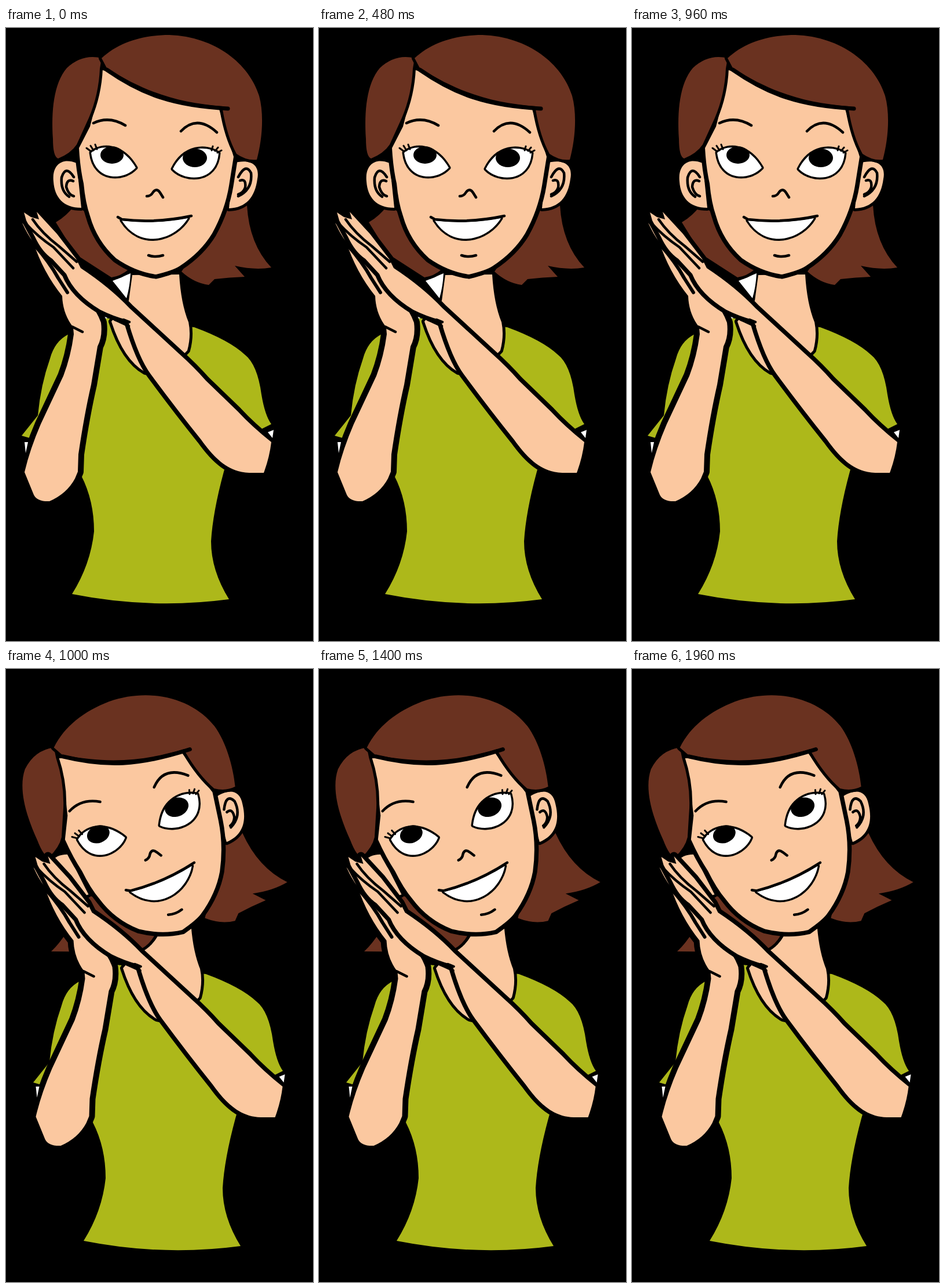
Animation of 530 by 1057 pixels, one loop 2000 ms. Source, as an HTML page:

```html
<!DOCTYPE html>
<html lang="en">
<head>
<meta charset="utf-8">
<title>Tilting head</title>
<style>
  html, body { margin: 0; width: 100%; height: 100%; overflow: hidden; background: #000; }
  svg { display: block; width: 100%; height: 100%; }
  path, ellipse { stroke: #000; stroke-width: 10; stroke-linejoin: round; stroke-linecap: round; paint-order: stroke; }
  .skin { fill: #fbc8a0; }
  .hair { fill: #6a3220; }
  .shirt { fill: #adb81a; }
  .white { fill: #fff; stroke-width: 7; }
  .line { fill: none; stroke-width: 4.5; }
  .thin { fill: none; stroke-width: 3; }
  .bold { stroke-width: 15; }
  .heavy { stroke-width: 20; }
  .bare { stroke: none; }
</style>
</head>
<body>
<svg viewBox="0 0 530 1057">
  <g id="body">
    <path class="shirt" d="M108 528 Q84 540 76 570 Q60 615 55 668 L27 703 L48 709 L110 640 L130 772 Q152 815 152 868 Q146 925 114 976 Q250 1003 385 985 Q354 935 354 885 Q357 835 376 765 L400 680 L440 692 L458 683 Q447 668 441 632 Q434 580 412 563 Q385 538 325 516 L170 500 Z"/>
    <path class="skin" d="M218 426 L299 425 Q302 475 315 507 Q320 530 313 556 L270 600 L240 593 Q203 572 182 506 L212 470 Z"/>
  </g>

  <path id="collar" class="white bare" d="M184 436 L215 423 Q214 445 208 466 Z M165 494 L176 500 L166 502 Z"/>
  <path id="tuckedHair" class="hair" d="M106 452 Q92 474 78 487 L215 488 L235 479 Q249 473 257 459 L200 430 Z"/>

  <g id="head">
    <path class="hair" d="M390 290 L416 306 Q420 373 458 413 Q430 418 395 410 L412 429 Q385 430 360 433 L350 443 Q325 440 303 420 Z"/>
    <path class="hair" d="M118 306 Q105 324 86 335 L120 390 L182 430 Q198 428 212 416 L160 330 Z"/>
    <path class="skin" d="M122 233 C95 222 79 238 82 265 C84 292 99 310 130 310 Z"/>
    <path class="skin" d="M392 233 C420 225 439 234 434 260 C430 292 414 310 385 311 Z"/>
    <path id="leftEarFold" class="line" d="M117 257 Q103 235 96 258 Q94 281 109 291 M116 264 Q105 259 104 274 Q108 288 117 290"/>
    <path class="line" d="M401 257 Q414 232 423 250 Q426 278 401 290 M404 263 Q415 259 413 275 Q410 284 401 287"/>
    <path class="skin bold" d="M165 72 L160 112 L145 170 L126 207 Q128 242 134 268 Q137 301 145 324 Q157 367 190 397 Q223 420 259 425 Q288 418 299 411 Q336 387 356 354 Q378 314 385 272 L393 222 L368 140 L230 95 Z"/>
    <path class="hair" d="M165 52 Q132 44 105 69 C82 96 78 144 81 191 Q81 222 90 225 Q112 216 122 201 L143 155 Q160 115 162 70 Z"/>
    <path class="hair" d="M165 52 C195 24 237 12 282 12 C362 15 420 62 437 117 C446 150 442 194 433 227 Q415 229 398 217 Q382 188 374 141 L374 135 C300 129 244 113 174 69 Z"/>
    <path class="line" style="stroke-width:7" d="M174 72 C236 115 290 134 383 139"/>

    <path class="line" d="M151 164 Q178 151 206 168 M302 178 Q330 149 364 180 M243 290 Q250 290 254 283 Q260 275 266 284 L271 292 M246 392 Q258 396 271 392"/>
    <path class="white" d="M147 215 C165 200 201 201 224 241 C204 263 153 266 147 215 Z"/>
    <path class="white" d="M288 243 C308 203 345 202 367 216 C363 266 310 266 288 243 Z"/>
    <ellipse class="bare" cx="183" cy="219" rx="20" ry="15"/>
    <ellipse class="bare" cx="326" cy="224" rx="21" ry="16"/>
    <path class="thin" d="M147 213 L139 207 M151 211 L146 203 M157 209 L154 201 M355 211 L357 204 M361 212 L366 206 M365 215 L372 211"/>
    <path class="white" d="M200 332 Q258 339 314 328 C292 365 232 383 200 332 Z"/>
    <path class="line" d="M193 326 L200 330 Q258 337 320 324"/>
  </g>

  <g id="arms">
    <path class="skin heavy" d="M28 336 Q37 356 47 369 Q64 421 97 462 Q98 493 116 516 L117 528 Q112 566 99 600 L60 683 Q41 727 32 766 L48 805 Q54 817 75 816 Q105 803 119 777 L124 765 L125 735 Q135 667 147 615 L158 549 Q167 532 164 508 Q157 488 143 474 L95 410 Z"/>
    <!-- hand and forearm drawn as one shape, so the wrist stays open -->
    <path class="skin bold" d="M212 509 Q230 570 250 597 Q296 659 337 710 C362 745 386 766 420 767 L445 767 Q455 740 458 714 Q424 687 400 661 L345 608 Q325 585 298 561 L213 483 Q179 447 129 414 L121 398 L88 355 L53 317 L57 330 L43 326 L31 318 L35 332 L50 360 Q62 386 80 398 L104 424 Q118 459 163 486 Q185 497 208 503 Z"/>
    <path class="line" d="M34 337 Q54 359 82 378 L116 414 M46 330 Q62 354 91 376 L122 403 M114 515 L132 524 M188 503 Q202 509 212 514 M203 503 L213 507"/>
    <path class="line" style="stroke-width:6" d="M49 374 Q76 405 90 431 L106 456"/>
    <path class="white bare" d="M452 697 L462 693 L460 707 Z M32 714 L38 714 L34 733 Z"/>
  </g>
</svg>
<script>
  const part = id => document.getElementById(id);
  const place = (id, transform) => part(id).setAttribute('transform', transform);
  const show = (id, visible) => part(id).setAttribute('visibility', visible ? 'visible' : 'hidden');

  // Two held poses, one second each.
  function draw() {
    const tilted = performance.now() % 2000 >= 1000;
    place('body', tilted ? 'translate(20 10)' : '');
    place('arms', tilted ? 'translate(19.5 6)' : '');
    place('head', tilted ? 'translate(-90 146) rotate(-21)' : '');
    show('collar', !tilted);
    show('leftEarFold', !tilted);
    show('tuckedHair', tilted);
    requestAnimationFrame(draw);
  }
  draw();
</script>
</body>
</html>
```
